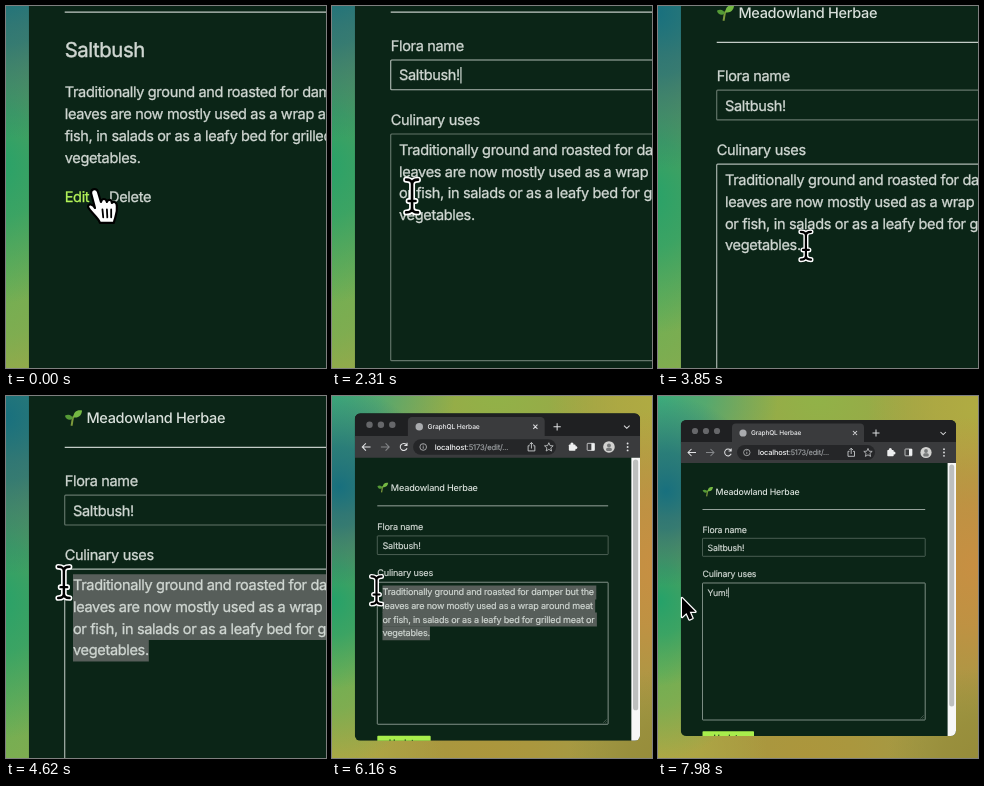
An HTML page with a canvas that plays this animation: 320x362 px, repeating every 8000 ms.

```html
<!DOCTYPE html>
<html lang="en">
<head>
<meta charset="utf-8">
<title>Editing a plant entry</title>
<style>
html, body { margin: 0; width: 100%; height: 100%; overflow: hidden; background: #0b2517; }
canvas { display: block; width: 100vw; height: 100vh; }
</style>
</head>
<body>
<canvas id="stage"></canvas>
<script>
const W = 320, H = 362, LOOP = 8000;
const canvas = document.getElementById('stage');
const ctx = canvas.getContext('2d');

// Layout in unzoomed stage units
const PAGE = '#0b2517', TEXT = '#d0d7d2', DIM = '#64766b', LIT = '#aeb9b2', LIME = '#b4f45a';
const WIN = { x: 22.8, y: 24, w: 275.2, h: 316 };
const LEFT = 44.5, RIGHT = 267.2, PAD = 49.5, BODY = 8.77, ROW = 13.1, AREA_TOP = 187;
const FIRST_ROW = 196.6;

// Moments of the story, in ms
const NAV = 420, BANG = 2240, FOCUS_AREA = 2880, DRAG = 3700, REPLACE = 6950;
const PAN = 3490, ZOOM = 5362;

const viewLines = [
  'Traditionally ground and roasted for damper but the',
  'leaves are now mostly used as a wrap around meat or',
  'fish, in salads or as a leafy bed for grilled meat or',
  'vegetables.'
];
const editLines = [
  'Traditionally ground and roasted for damper but the',
  'leaves are now mostly used as a wrap around meat',
  'or fish, in salads or as a leafy bed for grilled meat or',
  'vegetables.'
];

const clamp = (v, a, b) => Math.min(b, Math.max(a, v));
const smooth = p => p * p * (3 - 2 * p);

// Remaining share of a critically damped spring
function spring(ms, rate) {
  const p = Math.max(0, ms) * rate;
  return (1 + p) * Math.exp(-p);
}

function camera(t) {
  const zoom = spring(t - ZOOM, 0.00577);
  const pan = spring(t - PAN, 0.0063);
  return { s: 1 + 0.655 * zoom, top: 24 - 120.3 * zoom - 45.5 * pan };
}

const path = [
  [0, 63.4, 220.9], [450, 63.4, 220.9], [900, 60.4, 230.5], [2180, 60.4, 230.5],
  [2310, 57.4, 224.5], [2380, 57.4, 224.5], [2850, 105.7, 242.6], [3430, 105.7, 242.6],
  [3680, 98.4, 236.3], [3870, 98.4, 236.3], [4500, 44, 195], [7350, 43.6, 194.6],
  [7850, 24, 202], [LOOP, 24, 202]
];

function pointer(t) {
  const i = Math.max(1, path.findIndex(k => k[0] > t));
  const [t0, x0, y0] = path[i - 1], [t1, x1, y1] = path[i];
  const p = smooth((t - t0) / (t1 - t0));
  return { x: x0 + (x1 - x0) * p, y: y0 + (y1 - y0) * p };
}

function press(t) {
  const spans = [[120, 300], [2820, 2960], [DRAG, 4560]];
  let size = 1;
  for (const [a, b] of spans) {
    size -= 0.15 * clamp((t - a) / 90, 0, 1) * clamp((b + 90 - t) / 90, 0, 1);
  }
  return size;
}

function setFont(size, weight = 400) {
  ctx.font = `${weight} ${size}px Inter, Roboto, sans-serif`;
  ctx.letterSpacing = `${-0.022 * size}px`;
}

function label(str, x, mid, size = BODY, color = TEXT, weight = 400) {
  setFont(size, weight);
  const base = mid + size * 0.36;
  ctx.fillStyle = ctx.strokeStyle = color;
  ctx.fillText(str, x, base);
  if (weight === 400) {
    // A hairline gives the text its slightly heavier smoothing
    ctx.lineWidth = size * 0.02;
    ctx.strokeText(str, x, base);
  }
  return ctx.measureText(str).width;
}

function box(x, y, w, h, color, r = 0) {
  ctx.fillStyle = color;
  ctx.beginPath();
  ctx.roundRect(x, y, w, h, r);
  ctx.fill();
}

function dot(x, y, r, color) {
  ctx.fillStyle = color;
  ctx.beginPath();
  ctx.arc(x, y, r, 0, 7);
  ctx.fill();
}

function frame(x, y, w, h, color) {
  ctx.strokeStyle = color;
  ctx.lineWidth = 0.7;
  ctx.beginPath();
  ctx.roundRect(x, y, w, h, 0.6);
  ctx.stroke();
}

function line(d, color, width = 1) {
  ctx.strokeStyle = color;
  ctx.lineWidth = width;
  ctx.stroke(new Path2D(d));
}

function caret(x, mid) {
  box(x + 0.3, mid - 5, 0.65, 10, '#e8eeea');
}

function wallpaper() {
  ctx.fillStyle = '#a39a45';
  ctx.fillRect(-5, -5, W + 10, H + 10);
  const glows = [
    [160, 0, 130, '145,178,72'], [320, 10, 110, '176,172,66'], [320, 170, 150, '200,143,66'],
    [150, 362, 120, '172,150,60'], [320, 362, 90, '150,140,58'],
    [0, 362, 110, '176,168,68'], [0, 275, 90, '112,176,84'], [0, 0, 120, '60,172,124'],
    [0, 205, 85, '36,162,106'], [8, 95, 95, '24,112,126']
  ];
  for (const [x, y, r, rgb] of glows) {
    const g = ctx.createRadialGradient(x, y, 0, x, y, r);
    g.addColorStop(0, `rgba(${rgb},1)`);
    g.addColorStop(0.4, `rgba(${rgb},.75)`);
    g.addColorStop(1, `rgba(${rgb},0)`);
    ctx.fillStyle = g;
    ctx.fillRect(-5, -5, W + 10, H + 10);
  }
}

function chrome() {
  box(WIN.x, WIN.y, WIN.w, 24, '#1f2022');
  for (const x of [37, 48, 59]) dot(x, 35, 3.1, '#66676a');
  box(74, 27.5, 132, 22, '#3a3b3d', 4);
  box(WIN.x, 46, WIN.w, 21, '#3a3b3d');
  dot(85, 37, 3.6, '#a9abae');
  label('GraphQL Herbae', 93, 37, 6.5, '#e9eaec', 500);
  line('M195 35l4 4m0-4l-4 4M214.5 37h7M218 33.5v7M282.5 36l2.7 2.5l2.7-2.5', '#dcdddf');
  line('M38 56.5h-8m3.5-3.5l-3.5 3.5l3.5 3.5', '#e2e3e5');
  line('M48 56.5h8m-3.5-3.5l3.5 3.5l-3.5 3.5', '#85878a');
  line('M72.6 54.2a3.4 3.4 0 1 0 .6 3.6M73.2 52.5v2.5h-2.6', '#e2e3e5');
  box(79, 49, 138, 15, '#252628', 7.5);
  line('M92 56.5a3.2 3.2 0 1 0-6.4 0a3.2 3.2 0 1 0 6.4 0M88.8 55.8v2.4M88.8 54.2v.8', '#b9bbbd', 0.8);
  const host = label('localhost', 100, 56.5, 7.4, '#f0f1f2', 500);
  label(':5173/edit/...', 100 + host, 56.5, 7.4, '#9da0a3');
  line('M191.5 55.3h-1.5v5h6.5v-5h-1.5M193.2 58v-5.8m-1.8 1.8l1.8-1.8l1.8 1.8', '#c8cacc', 0.9);
  line('M210 52.4l1.2 2.8l3 .2l-2.3 2l.7 3l-2.6-1.6l-2.6 1.6l.7-3l-2.3-2l3-.2z', '#c8cacc', 0.8);
  box(229.3, 54, 6.4, 6.2, '#eeeff0', 0.8);
  dot(232.3, 53.6, 1.5, '#eeeff0');
  dot(236, 57, 1.5, '#eeeff0');
  frame(247, 53, 7, 6.8, '#eeeff0');
  box(251, 53, 3, 6.8, '#eeeff0');
  dot(268, 56.5, 5.6, '#d2d2d0');
  dot(268, 55, 1.9, '#77797a');
  box(265.2, 57.3, 5.6, 3.2, '#77797a', 1.5);
  for (const y of [53.2, 56.5, 59.8]) dot(286, y, 0.9, '#e2e3e5');
}

function header() {
  line('M48.6 100.4C49.3 97.5 49 95.5 50.1 94.4', '#7d9a3c', 1.2);
  ctx.fillStyle = '#74b843';
  ctx.fill(new Path2D('M49.8 95.2C49.7 92 52 90.4 55 91.1C54.7 94.3 52.5 95.9 49.8 95.2z'));
  ctx.fillStyle = '#559a36';
  ctx.fill(new Path2D('M49.6 96C48.8 93.7 46.5 93 44.6 94.3C45.3 96.7 47.6 97.5 49.6 96z'));
  label('Meadowland Herbae', 57.6, 95.7, BODY, '#d9e0db', 500);
  box(LEFT, 113, RIGHT - LEFT, 0.75, '#c3cbc6');
}

function viewPage() {
  label('Saltbush', LEFT, 136, 12.3);
  viewLines.forEach((s, i) => label(s, LEFT, 161.8 + i * ROW));
  label('Edit', LEFT, 225.2, BODY, LIME);
  label('Delete', 71.3, 225.2);
}

// Highlight from the pointer to the end of the text
function selection(at) {
  const row = clamp(Math.floor((at.y - FIRST_ROW) / ROW + 0.5), 0, 3);
  setFont(BODY);
  const width = s => ctx.measureText(s).width;
  for (let i = row; i < 4; i++) {
    const s = editLines[i];
    let n = 0;
    if (i === row) while (n < s.length && PAD + width(s.slice(0, n + 1)) < at.x + 2) n++;
    const from = width(s.slice(0, n)), to = width(i < 3 ? s + ' ' : s);
    box(PAD + from, FIRST_ROW + (i - 0.5) * ROW, to - from, ROW + 0.4, '#575e5a');
  }
}

function formPage(t, at) {
  const inArea = t >= FOCUS_AREA;
  label('Flora name', LEFT, 133.5);
  frame(LEFT, 142.3, RIGHT - LEFT, 18, inArea ? DIM : LIT);
  const nameW = label(t < BANG ? 'Saltbush' : 'Saltbush!', PAD, 151.5);
  const nameOn = (t >= 900 && t < 1400) || (t >= 1960 && !inArea);
  if (nameOn) caret(PAD + nameW, 151.5);

  label('Culinary uses', LEFT, 178.2);
  frame(LEFT, AREA_TOP, RIGHT - LEFT, 137, inArea ? LIT : DIM);
  line('M262.5 322.5l3.2-3.2M264.5 322.5l1.2-1.2', '#8b968f', 0.4);

  if (t < REPLACE) {
    if (t >= DRAG) selection(at);
    let w = 0;
    editLines.forEach((s, i) => { w = label(s, PAD, FIRST_ROW + i * ROW); });
    if (inArea && t < 3450) caret(PAD + w, FIRST_ROW + 3 * ROW);
  } else {
    const typed = [REPLACE, 7100, 7250, 7500].filter(k => t >= k).length;
    const w = label('Yum!'.slice(0, typed), PAD, FIRST_ROW);
    caret(PAD + w, FIRST_ROW);
  }
  box(LEFT, 335.2, 51.5, 20, '#a8ee4c', 0.8);
  label('Update', 55.5, 342, BODY, '#12301d', 500);
}

function drawPointer(t, at, cam) {
  ctx.save();
  ctx.translate(WIN.x + (at.x - WIN.x) * cam.s, cam.top + (at.y - WIN.y) * cam.s);
  const k = (22 + 9.5 * cam.s) / 38 * press(t);
  ctx.scale(k, k);
  ctx.lineJoin = ctx.lineCap = 'round';
  if (t < NAV) {
    const hand = 'M-5 3C-5-2 1-2 2 2L5 12C6 8 10 8 11 12C12 9 16 9 16 13C18 11 21 12 21 16' +
      'C22 24 19 27 18 33L4 33C2 27-6 22-8 17C-8 13-3 14-1 18z';
    ctx.fillStyle = '#fff';
    ctx.fill(new Path2D(hand));
    line(hand, '#000', 2.2);
    line('M6.5 19.5l.8 8M11 19.5l.4 8M15.3 19.5v8', '#000', 1.8);
  } else if (at.x > 42) {
    const beam = 'M-6-16.5C-2-16.5 0-15 0-12C0-15 2-16.5 6-16.5M0-12V12' +
      'M-6 16.5C-2 16.5 0 15 0 12C0 15 2 16.5 6 16.5M-3.5 5H3.5';
    line(beam, '#fff', 6);
    line(beam, '#000', 2.6);
  } else {
    const arrow = 'M0 0V23L5.4 18L8.9 26L12.7 24.4L9.2 16.5H16.2z';
    line(arrow, '#fff', 3);
    ctx.fillStyle = '#000';
    ctx.fill(new Path2D(arrow));
  }
  ctx.restore();
}

function draw(t) {
  const ratio = window.devicePixelRatio || 1;
  const w = Math.round(innerWidth * ratio), h = Math.round(innerHeight * ratio);
  if (canvas.width !== w || canvas.height !== h) {
    canvas.width = w;
    canvas.height = h;
  }
  ctx.setTransform(w / W, 0, 0, h / H, 0, 0);
  ctx.textRendering = 'geometricPrecision';
  const cam = camera(t), at = pointer(t);

  ctx.save();
  ctx.translate(WIN.x, cam.top);
  ctx.scale(cam.s, cam.s);
  ctx.translate(-WIN.x, -WIN.y);
  wallpaper();
  ctx.beginPath();
  ctx.roundRect(WIN.x, WIN.y, WIN.w, WIN.h, 5.5);
  ctx.clip();
  box(WIN.x, WIN.y, WIN.w, WIN.h, PAGE);
  chrome();
  header();
  if (t < NAV) viewPage(); else formPage(t, at);
  box(289.6, 67, 8.4, 273, '#f7f7f7');
  box(291.2, 68.5, 5, 242, '#bdbfbe', 2.5);
  ctx.restore();

  drawPointer(t, at, cam);
}

function tick() {
  draw(performance.now() % LOOP);
  requestAnimationFrame(tick);
}
tick();
</script>
</body>
</html>
```
